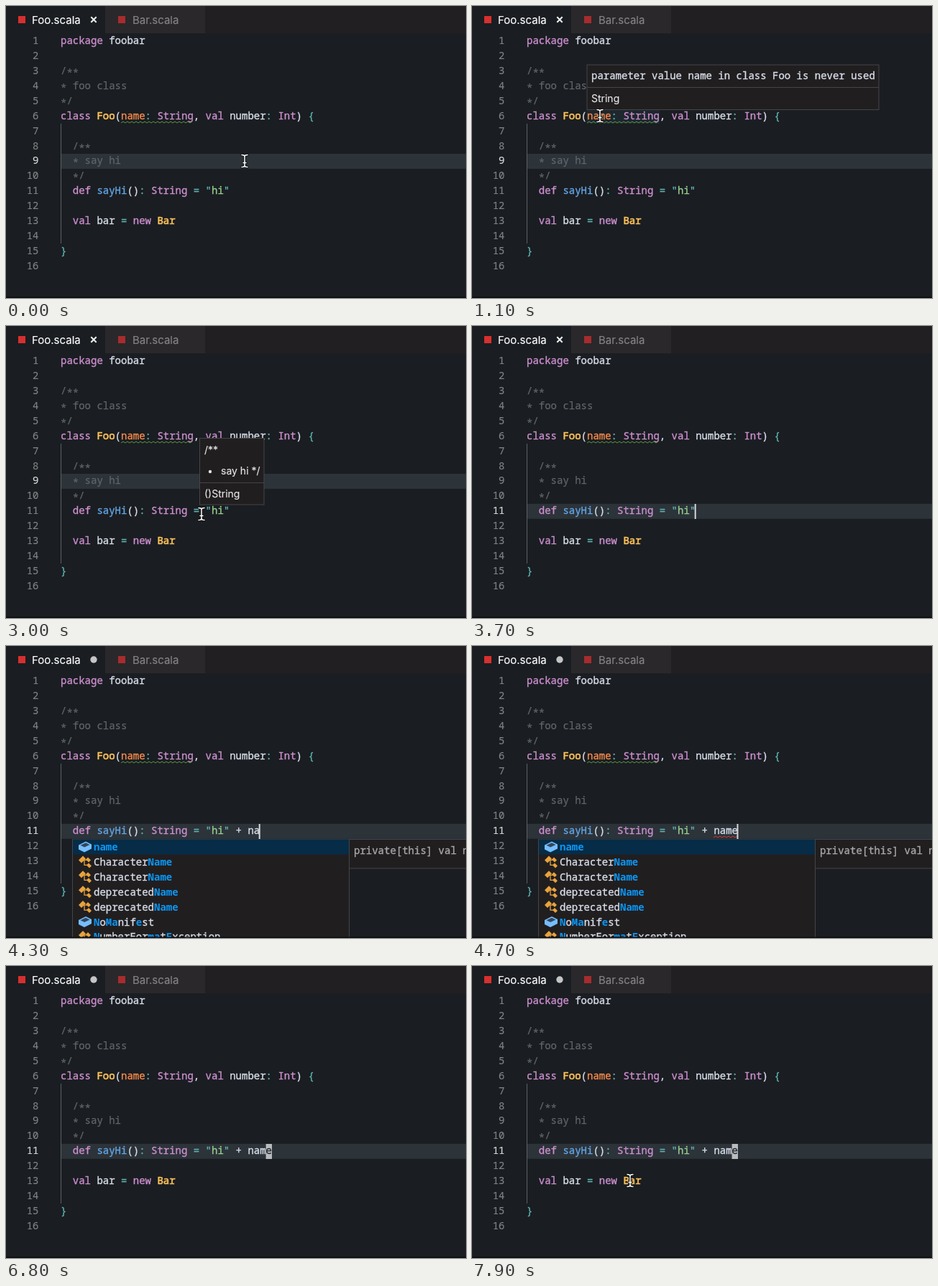
An HTML page for the animation above (8 s loop, 640 by 407 pixels).

```html
<!DOCTYPE html>
<html lang="en">
<head>
<meta charset="utf-8">
<title>Editor</title>
<style>
html, body { margin: 0; width: 100%; height: 100%; overflow: hidden; background: #1a1d21; }
svg { display: block; width: 100vw; height: 100vh; }
text { white-space: pre; fill: currentColor; stroke: currentColor; stroke-width: 0; }
/* A hairline stroke gives the code its medium weight. */
.code { font: 400 14px "Noto Sans Mono", "DejaVu Sans Mono", monospace; color: #d8dee9; stroke-width: .35; }
.ui { font: 400 14px Inter, "Open Sans", sans-serif; color: #e6e6e6; stroke-width: .15; }
.tab { font-size: 15px; }
.num { color: #808386; text-anchor: end; stroke-width: .15; }
.num.on { color: #d8d8d8; }
.key { color: #cd8fd0; }
.type { color: #fac057; stroke-width: .65; }
.param { color: #fb8c4c; }
.op { color: #5fb3b3; }
.fn { color: #62a5e4; }
.str { color: #99cf8f; }
.rem { color: #60656c; stroke-width: .25; }
.hit { fill: #0b97f5; stroke-width: 0; font-weight: 700; }
.box { fill: #211e20; stroke: #454546; }
</style>
</head>
<body>
<svg id="stage" viewBox="0 0 640 407" preserveAspectRatio="none"></svg>
<script>
const LOOP = 8000, STEP = 100;
const LEFT = 76, CHAR = 8.4, ROW = 20.93;
const colX = col => LEFT + col * CHAR;
const baseline = line => 53 + (line - 1) * ROW;
const rowTop = line => baseline(line) - 14.5;

const rect = (x, y, w, h, attrs) => `<rect x="${x}" y="${y}" width="${w}" height="${h}" ${attrs}/>`;
const label = (x, y, cls, str, attrs = "") => `<text x="${x}" y="${y}" class="${cls}" ${attrs}>${str}</text>`;

// Each line: start column, then "class:text" runs; comment stars sit at mid height.
const source = {
  1: [0, "key:package", ": foobar"],
  3: [0, "rem:/**"],
  4: [0, "rem:* foo class"],
  5: [0, "rem:*/"],
  6: [0, "key:class", ": ", "type:Foo", ":(", "param:name", "op::", ": ", "key:String", ":, ",
      "key:val", ": number", "op::", ": ", "key:Int", ":) ", "op:{"],
  8: [2, "rem:/**"],
  9: [2, "rem:* say hi"],
  10: [2, "rem:*/"],
  11: [2, "key:def", ": ", "fn:sayHi", ":()", "op::", ": ", "key:String", ": ", "op:=", ": ",
       "op:\"", "str:hi", "op:\""],
  13: [2, "key:val", ": bar ", "op:=", ": ", "key:new", ": ", "type:Bar"],
  15: [0, "op:}"]
};

function codeLine(line, [col, ...runs]) {
  let out = "";
  for (const run of runs) {
    const cut = run.indexOf(":"), cls = run.slice(0, cut);
    for (const part of run.slice(cut + 1).match(/\*+|[^*]+/g)) {
      const y = baseline(line) + (part[0] === "*" ? 3 : 0);
      out += label(colX(col), y, "code " + cls, part);
      col += part.length;
    }
  }
  return out;
}

function squiggle(x, end, y, color) {
  let d = `M${x} ${y + 1}`;
  for (let i = 1; x + i * 3 <= end; i++) d += `L${x + i * 3} ${y + (i % 2 ? -1 : 1)}`;
  return `<path d="${d}" fill="none" stroke="${color}"/>`;
}

function tabs() {
  return rect(0, 0, 640, 38, 'fill="#211f22"') +
    rect(0, 0, 138, 38, 'fill="#1a1d21"') + rect(138, 0, 139, 38, 'fill="#2a282b"') +
    rect(17, 14, 10, 10, 'fill="#d6302f"') + rect(156, 14, 10, 10, 'fill="#a82c2d"') +
    label(36, 24.5, "ui tab", "Foo.scala", 'style="color:#fff"') +
    label(176, 24.5, "ui tab", "Bar.scala", 'style="color:#858386"') +
    '<path id="close" d="M118.3 15.3l7.4 7.4m0-7.4l-7.4 7.4" stroke="#f2f2f2" stroke-width="2"/>' +
    '<circle id="dirty" cx="122" cy="19" r="4.7" fill="#c5c5c5"/>';
}

const fieldIcon = '<path d="M0 7l10-5 8 4v6l-10 5-8-4z" fill="#75beff"/>' +
  '<path d="M2.5 7.3l7.5-3.6 5.5 2.7-7.3 3.7z" fill="#211e20" opacity=".75"/>';
const classIcon = '<g fill="#e8a33d"><path d="M0 7l6-6 4 4-6 6z"/><path d="M13 3l4 4-3 3-4-4z"/>' +
  '<path d="M14 11l4 4-3 3-4-4z"/></g><path d="M7 7h5M8 7v7h4" fill="none" stroke="#e8a33d" stroke-width="1.3"/>';

// Brackets mark the matched letters.
const choices = ["[name]", "Character[Name]", "Character[Name]", "deprecated[Name]", "deprecated[Name]",
  "[N]o[Ma]nif[e]st", "[N]umberFor[ma]t[E]xception"];

function completions() {
  const rows = choices.map((choice, i) => {
    const y = 269.5 + i * 20.9;
    const str = choice.replace(/\[(.*?)\]/g, '<tspan class="hit">$1</tspan>');
    const icon = i === 0 || i === 5 ? fieldIcon : classIcon;
    return (i ? "" : rect(93, y, 384, 21, 'fill="#062c47"')) +
      `<g transform="translate(101 ${y + 1})">${icon}</g>` + label(122, y + 15.5, "code", str);
  });
  return rect(92.5, 269.5, 385, 150, 'class="box"') + rows.join("") +
    rect(477.5, 269.5, 180, 40.5, 'class="box"') +
    label(484, 289.5, "code", "private[this] val name: String", 'style="color:#a9a9aa"');
}

const warningTip = rect(160, 82, 406, 62.5, 'class="box"') +
  '<path d="M160 113.5h406" stroke="#454546"/>' +
  label(166, 102, "code", "parameter value name in class Foo is never used") +
  label(166, 134, "ui", "String");

const docTip = rect(269.5, 156.5, 89.5, 92.5, 'class="box"') +
  '<path d="M270 218.5h89" stroke="#454546"/>' +
  label(276, 178, "ui", "/**") + '<circle cx="284" cy="203" r="2.2" fill="#e2e2e2"/>' +
  label(299, 207, "ui", "say hi */") + label(276, 238.5, "ui", "()String");

const beam = "M-4-8.5Q0-8.5 0-6Q0-8.5 4-8.5M0-6V6M-4 8.5Q0 8.5 0 6Q0 8.5 4 8.5M-2 2.5H2";

function build() {
  let out = rect(0, 0, 640, 407, 'fill="#1a1d21"') + tabs() +
    rect(LEFT, 0, 564, 21, 'id="current" fill="#2c3339"') +
    '<path d="M76.5 164V331" stroke="#5c5f63"/>' +
    rect(159.5, 143, 101.5, 21, 'id="range" fill="#25333f" opacity=".45"');
  for (let n = 1; n <= 16; n++) {
    out += label(45.5, baseline(n), "code num", n, `id="n${n}"`);
    if (source[n]) out += codeLine(n, source[n]);
  }
  out += `<g id="warning">${squiggle(160, 261, 162, "#5a9a45")}</g>` +
    label(colX(28), baseline(11), "code", "", 'id="typed"') +
    `<g id="error">${squiggle(336, 370, 266, "#d93a3a")}</g>` +
    rect(0, 248, 2, 21, 'id="caret" fill="#d4d6d8"') +
    `<g id="block">${rect(colX(34), 248, CHAR, 21, 'fill="#b9bcbe"')}` +
    label(colX(34), baseline(11), "code", "e", 'style="color:#23272b"') + "</g>" +
    `<g id="list">${completions()}</g><g id="warningTip">${warningTip}</g><g id="docTip">${docTip}</g>` +
    `<g id="mouse" fill="none" stroke-linecap="round"><path d="${beam}" stroke="#111" stroke-width="3.4"/>` +
    `<path d="${beam}" stroke="#fff" stroke-width="1.5"/></g>` +
    rect(0, 405.5, 640, 1.5, 'fill="#0b0c0e"');
  document.getElementById("stage").innerHTML = out;
}

build();
const el = id => document.getElementById(id);
const show = (id, on) => el(id).setAttribute("visibility", on ? "visible" : "hidden");
const within = (t, from, to) => t >= from && t < to;

// time, x, y
const route = [[0, 332, 216], [100, 332, 216], [700, 178, 153], [2100, 178, 153], [2600, 272, 262],
  [3000, 272, 262], [3300, 311, 259], [7000, 311, 259], [7700, 220, 299], [LOOP, 220, 299]];

function mouseAt(t) {
  const i = route.findIndex(p => p[0] > t);
  const [t0, x0, y0] = route[i - 1], [t1, x1, y1] = route[i];
  const p = (t - t0) / (t1 - t0), e = p * p * (3 - 2 * p);
  return [x0 + (x1 - x0) * e, y0 + (y1 - y0) * e];
}

const keyTimes = [3800, 3900, 4000, 4200, 4300, 4400, 4500];

function draw(t) {
  const line = t < 3400 ? 9 : 11;
  el("current").setAttribute("y", rowTop(line));
  el("n9").classList.toggle("on", line === 9);
  el("n11").classList.toggle("on", line === 11);

  const count = keyTimes.filter(k => k <= t).length;
  el("typed").textContent = " + name".slice(0, count);
  el("caret").setAttribute("x", colX(28 + count) - 1.5);
  show("caret", within(t, 3400, 5200));
  show("block", t >= 5200);
  show("close", count === 0);
  show("dirty", count > 0);

  show("list", within(t, 4300, 5200));
  show("error", within(t, 4600, 5500));
  show("warning", t < 5600);
  show("range", within(t, 1000, 2200));
  show("warningTip", within(t, 1000, 2200));
  show("docTip", within(t, 2900, 3200));

  el("mouse").setAttribute("transform", `translate(${mouseAt(t)})`);
  show("mouse", t < 3500 || t >= 7000);
}

const start = performance.now();
function tick() {
  const t = (performance.now() - start) % LOOP;
  draw(Math.floor(t / STEP) * STEP);
  requestAnimationFrame(tick);
}
tick();
</script>
</body>
</html>
```
